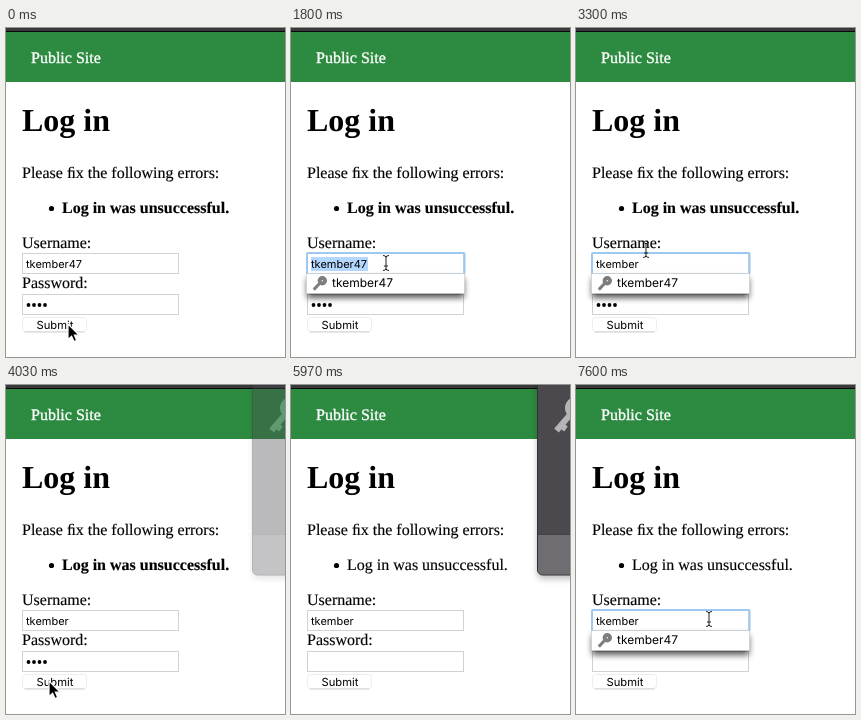
Animation of 279 by 329 pixels, one loop 8000 ms. Source, as an HTML page:

```html
<!DOCTYPE html>
<html lang="en">
<head>
<meta charset="utf-8">
<title>Log in</title>
<style>
  html, body { margin: 0; width: 100%; height: 100%; overflow: hidden; background: #fff; }
  svg { display: block; width: 100%; height: 100%; }
  text { white-space: pre; text-rendering: geometricPrecision; }
  .serif { font: 16px "Liberation Serif", serif; stroke: #000; stroke-width: .15; }
  .bold { font-weight: bold; }
  .site { fill: #fff; stroke: #fff; stroke-width: .35; }
  .title { font: bold 32px "Liberation Serif", serif; }
  .ui { font: 11px Inter, sans-serif; }
  .menu { font: 12px Inter, sans-serif; }
  .button { font: 11.2px Inter, sans-serif; }
  .field { fill: #fff; stroke: #d2d2d2; }
</style>
</head>
<body>
<svg viewBox="0 0 279 329">
  <defs>
    <filter id="soft" x="-20%" y="-100%" width="140%" height="300%"><feGaussianBlur stdDeviation="3"/></filter>
  </defs>
  <rect width="279" height="329" fill="#fff"/>
  <rect width="279" height="54" fill="#2d8b41"/>
  <rect width="279" height="3" fill="#39383b"/>
  <rect y="3" width="279" height="1" fill="#080808"/>
  <text class="serif site" x="25" y="34.7">Public Site</text>
  <text class="title" x="16" y="102.5">Log in</text>
  <text class="serif" x="16" y="149.5">Please ﬁx the following errors:</text>
  <circle cx="45.5" cy="180.5" r="2.6"/>
  <text class="serif" id="error" x="56" y="184.5">Log in was unsuccessful.</text>
  <text class="serif" x="16" y="219.7">Username:</text>
  <text class="serif" x="16" y="259.7">Password:</text>

  <rect class="field" x="16.5" y="225.5" width="156" height="20"/>
  <rect id="ring" x="16" y="225" width="157.5" height="21" rx="1" fill="none" stroke="#9cc8f2" stroke-width="2"/>
  <rect id="selection" x="20" y="229" width="57" height="14" fill="#b3d7fe"/>
  <text class="ui" id="user" x="20" y="240"></text>
  <rect id="caret" x="63" y="229" width="1" height="14"/>

  <rect class="field" x="16.5" y="266.5" width="156" height="20"/>
  <g id="dots">
    <circle cx="22.5" cy="277" r="1.9"/><circle cx="28" cy="277" r="1.9"/>
    <circle cx="33.5" cy="277" r="1.9"/><circle cx="39" cy="277" r="1.9"/>
  </g>
  <rect x="16.5" y="289.5" width="64" height="14" rx="3" fill="#fff" stroke="#ededed"/>
  <path d="M18.5 304H78.5" stroke="#d0d0d0"/>
  <text class="button" x="30.5" y="300.5">Submit</text>

  <g id="menu">
    <rect x="16" y="250" width="157" height="20" fill="#000" opacity=".65" filter="url(#soft)"/>
    <rect x="15.5" y="245.5" width="158" height="20" fill="#fff" stroke="#c8c8c8" stroke-width=".6"/>
    <g stroke="#7d7d7d" fill="none">
      <circle cx="31.3" cy="252.8" r="2.7" stroke-width="4"/>
      <path d="M29 255L22.8 261.6" stroke-width="3"/>
    </g>
    <text class="menu" x="41" y="259.3">tkember47</text>
  </g>

  <g id="arrow">
    <path d="M0 0V15.5L3.6 12.2L6 17.6L8.7 16.4L6.4 11.2H11Z" stroke="#fff" stroke-width="1.2"/>
  </g>
  <g id="beam" fill="none">
    <path d="M-3 -7.5Q0 -7.5 0 -5.5Q0 -7.5 3 -7.5M0 -5.5V5.5M-3 7.5Q0 7.5 0 5.5Q0 7.5 3 7.5M-2 3H2" stroke="#222"/>
  </g>

  <g id="panel">
    <rect x="246" y="-10" width="50" height="204" rx="6" fill="#000" opacity=".25" filter="url(#soft)"/>
    <rect x="246.5" y="-10" width="50" height="200" rx="5" fill="#4b494e" stroke="#343337"/>
    <path id="strip" d="M247 150H290V189.5H252Q247 189.5 247 184.5Z"/>
    <path d="M247 149.5H279" stroke="#454348"/>
    <g stroke="#b5b4b7" fill="none">
      <path d="M265.5 45.5L285 23M271 41l4 3" stroke-width="6"/>
      <circle cx="285" cy="23" r="7" stroke-width="8"/>
    </g>
  </g>
</svg>
<script>
const LOOP = 8000;
const NAME = "tkember47";
const $ = id => document.getElementById(id);
const show = (id, on) => $(id).setAttribute("opacity", +on);
const within = (t, a, b) => t >= a && t < b;

// Pointer poses, each held until the next: time, x, y, shape
const poses = [
  [0, 62, 296, "arrow"],
  [600, 66, 288, "arrow"],
  [750, 76, 269, "arrow"],
  [900, 87, 249, "arrow"],
  [1050, 93, 239, "beam"],
  [1200, 95, 235, "beam"],
  [3150, 86, 229, "beam"],
  [3300, 70, 222, "beam"],
  [3450, 54, 242, "beam"],
  [3600, 47, 272, "beam"],
  [3750, 44, 292, "arrow"],
  [3880, 43, 296, "arrow"],
  [4630, 43, 297, "arrow"],
  [4920, 158, 232, "arrow"],
  [5070, 300, 170, "arrow"],
  [6420, 262, 196, "arrow"],
  [6570, 200, 216, "arrow"],
  [6700, 154, 231, "beam"],
  [6850, 133, 234, "beam"]
];

// Last step whose start time has passed
const held = (t, steps) => steps.filter(s => s[0] <= t).pop();

function draw(t) {
  const [, x, y, shape] = held(t, poses);
  for (const id of ["arrow", "beam"]) {
    show(id, id === shape);
    $(id).setAttribute("transform", `translate(${x} ${y})`);
  }

  $("user").textContent = NAME.slice(0, held(t, [[0, 9], [2700, 8], [2850, 7]])[1]);
  show("selection", within(t, 1650, 2700));
  show("ring", within(t, 1350, 3880) || t >= 7150);
  show("menu", held(t, [[0, 0], [1650, .6], [1800, 1], [2700, 0], [2850, 1], [3880, 0], [7150, 1]])[1]);
  show("caret", within(t, 2850, 3150) || within(t, 7150, 7600));

  show("dots", t < 4480);
  $("error").classList.toggle("bold", t < 4480);

  show("panel", held(t, [[0, 0], [4030, .38], [4180, 1], [6270, .6], [6420, .2], [6570, 0]])[1]);
  $("strip").setAttribute("fill",
    held(t, [[0, "#666469"], [5070, "#6f6d72"], [5670, "#8b898e"], [5970, "#6f6d72"]])[1]);
}

const start = performance.now();
function tick() {
  draw((performance.now() - start) % LOOP);
  requestAnimationFrame(tick);
}
tick();
</script>
</body>
</html>
```
